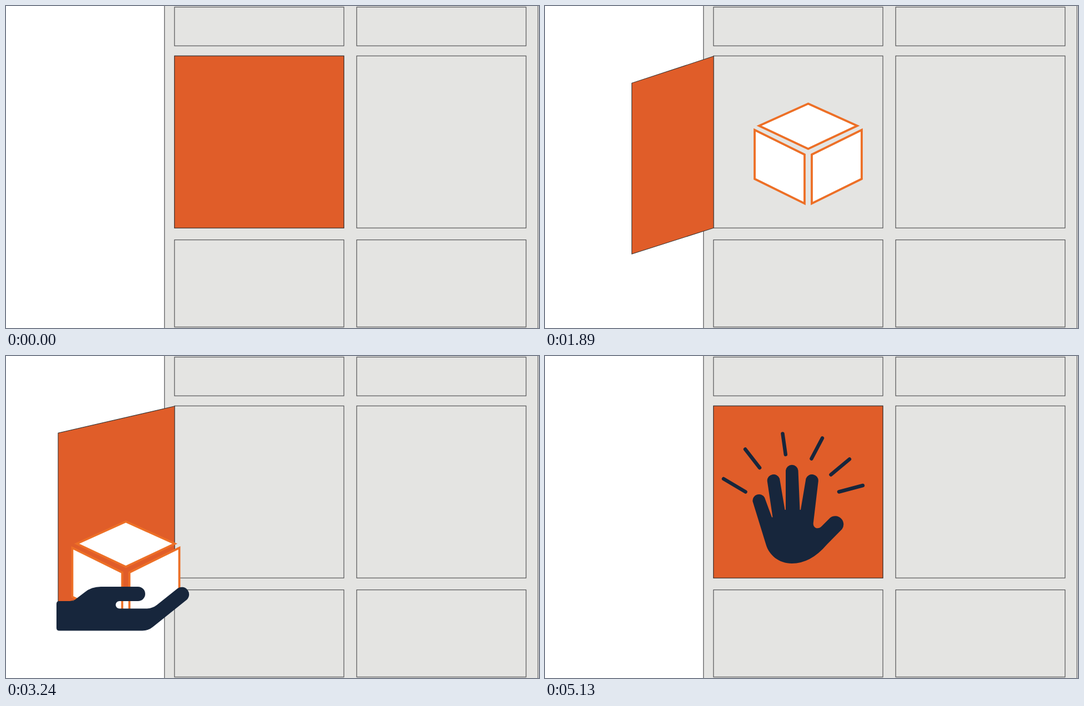
Write an HTML page that moves like this. It is 961x582 px and loops after 5570 ms.

```html
<!DOCTYPE html>
<html lang="en">
<head>
<meta charset="utf-8">
<title>Locker</title>
<style>
  html, body { margin: 0; width: 100%; height: 100%; overflow: hidden; background: #fff; }
  svg { display: block; width: 961px; height: 582px; }
  .cell { fill: none; stroke: #48484a; stroke-width: 1.1; }
  .door { fill: #e05d29; stroke: #3a3533; stroke-width: 1.1; }
  .box { fill: #fff; stroke: #ed6f26; stroke-width: 3.8; }
  .navy { fill: #17263c; }
  .rays { fill: none; stroke: #17263c; stroke-width: 6.5; stroke-linecap: round; }
</style>
</head>
<body>
<svg viewBox="0 0 961 582">
  <rect x="285.7" y="-5" width="673.6" height="592" fill="#e4e4e2" stroke="#6a6a6d" stroke-width="1.4"/>
  <g id="cells" class="cell"></g>
  <g id="layers">
    <g id="box" class="box">
      <path d="M474.5 176.6 563 216.5 474.5 258.2 386 216.5Z"/>
      <path d="M378 224 468 268.5V357L378 312.5Z"/>
      <path d="M571 224 481 268.5V357L571 312.5Z"/>
    </g>
    <path id="door" class="door"/>
  </g>
  <path id="carry" class="navy" d="M163 428q0-5 5-5H193L214 407Q226 397 243 397H310a13 13 0 0 1 0 26H276.500a6.800 6.800 0 0 0 0 13.600H324Q336 436.500 344 430L381.500 400A13.200 13.200 0 0 1 398 420.500L337 469.500Q329 476.500 318 476.500H168q-5 0-5-5Z"/>
  <g id="wave">
    <path class="navy" d="M374.500 263A11.500 11.500 0 0 1 396 256L409 291.500H410.500L400.700 226A11.500 11.500 0 0 1 423 221.500L432.500 278H434V207A11.300 11.300 0 0 1 456.500 207L459.500 278H461L470.500 221.500A11.500 11.500 0 0 1 492.800 226L484 300C482 311 492 315 499 307.500L514 292.500A15 15 0 0 1 535.500 313L508 341Q479 375 445 375C422 375 404 360 398.500 341Z"/>
    <path class="rays" d="M322 222 361.500 245.500M361 168.500 387 202M428.500 140.500 433.800 178M500 148.500 480.500 185.500M549 186.500 515.500 214.500M573 234 530 245.500"/>
  </g>
</svg>
<script>
const LOOP = 5570, STEP = 270;
const HINGE = 304, CLOSED = 609;
const $ = id => document.getElementById(id);

const rows = [[2, 72], [90.2, 401.2], [422.7, 580.2]];
$('cells').innerHTML = [303.8, 632.3].map(x => rows.map(([top, bottom]) =>
  `<rect x="${x}" y="${top}" width="305.4" height="${bottom - top}"/>`).join('')).join('');

// x of the door's free edge at each step
const edges = [CLOSED, 550, 490, 430, 369.5, 260, 203, 156.5, 94, 94,
  94, 94, 94, 94, 158.5, 252, 405, 510, CLOSED, CLOSED];

// hand offset while reaching and carrying
const carry = { 9: [85, -80], 10: [71, -39], 11: [0, 0], 12: [-72, 20], 13: [-141, 40] };
const PICKUP = 10, GONE = 14, WAVE = 19;

const show = (el, on) => { el.style.display = on ? '' : 'none'; };
const move = (el, x, y) => el.setAttribute('transform', `translate(${x} ${y})`);

function doorPath(edge) {
  return edge === CLOSED
    ? 'M303.8 90.2H609.2V401.2H303.8Z'
    : `M${HINGE} 90.8 ${edge} 139.300V448.200L${HINGE} 401.200Z`;
}

function draw(step) {
  const edge = edges[step], hand = carry[step];
  $('door').setAttribute('d', doorPath(edge));
  // the open door swings behind the box
  $('layers').append(...(edge > HINGE ? [$('box'), $('door')] : [$('door'), $('box')]));

  show($('box'), step < GONE);
  if (hand && step >= PICKUP) move($('box'), hand[0] - 186.5, hand[1] + 102.7);
  else move($('box'), 0, 0);

  show($('carry'), hand);
  if (hand) move($('carry'), ...hand);
  show($('wave'), step === WAVE);
}

const start = performance.now();
let last = -1;
function tick() {
  const time = (performance.now() - start) % LOOP;
  const step = Math.min(edges.length - 1, Math.floor(time / STEP));
  if (step !== last) draw(last = step);
  requestAnimationFrame(tick);
}
tick();
</script>
</body>
</html>
```
